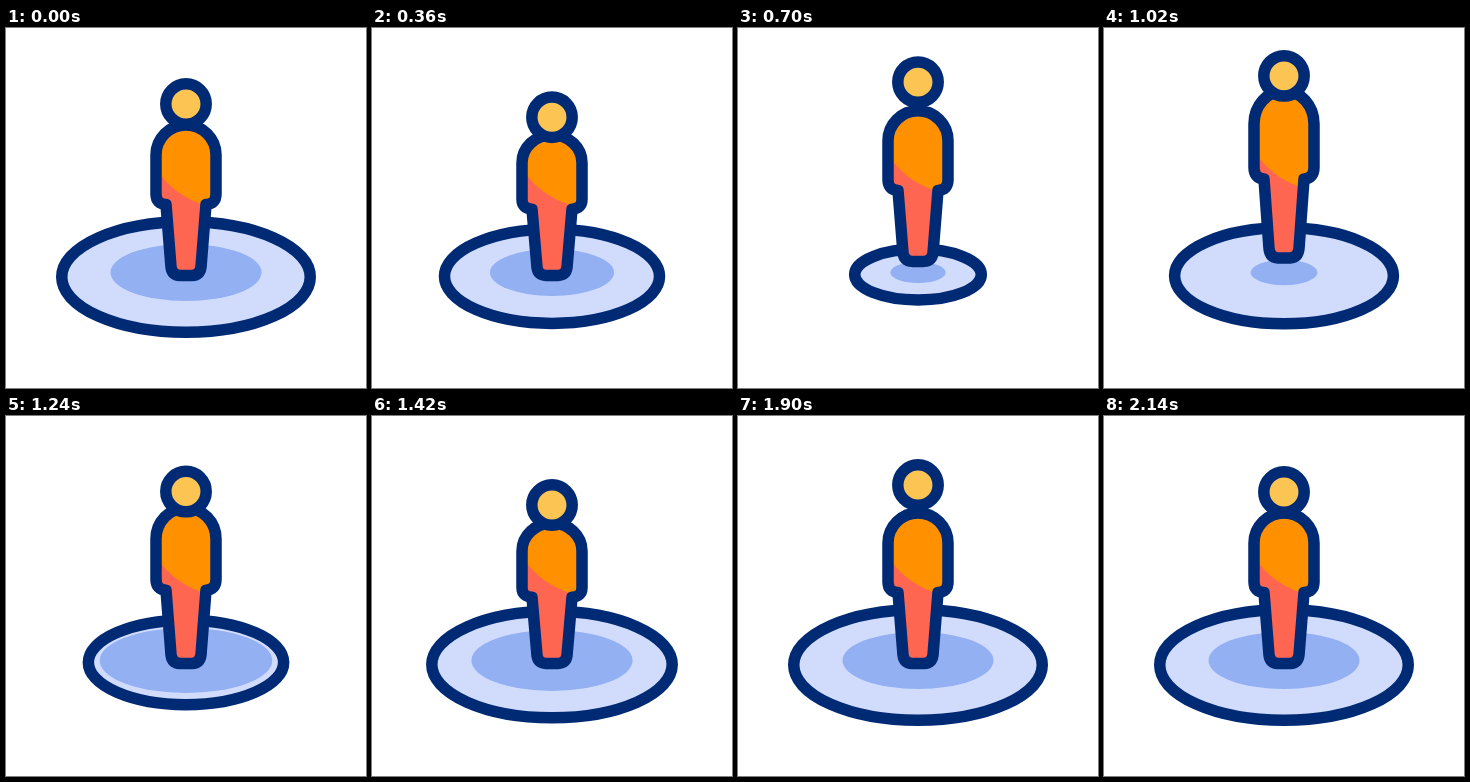
Animation, 360 px wide and 360 px high, one loop 3 s. Source, as an HTML page:

```html
<!DOCTYPE html>
<html lang="en">
<head>
<meta charset="utf-8">
<title>Figure hopping on a disc</title>
<style>
  html, body { margin: 0; width: 100%; height: 100%; overflow: hidden; background: #fff; }
  svg { display: block; width: 100vw; height: 100vh; }
  .line { stroke: #012a75; stroke-width: 11.5; stroke-linejoin: round; }
</style>
</head>
<body>
<svg viewBox="0 0 360 360">
  <defs><clipPath id="bodyClip"><path id="clipShape"/></clipPath></defs>
  <ellipse id="disc" class="line" cx="180" fill="#d1dcfd"/>
  <ellipse id="pad" cx="180" cy="244.5" fill="#93b0f3"/>
  <path id="body" fill="#ff9100"/>
  <path id="shade" fill="#ff6652" clip-path="url(#bodyClip)"/>
  <path id="outline" class="line" fill="none"/>
  <circle id="head" class="line" cx="180" r="20.2" fill="#fcc453"/>
</svg>
<script>
const LOOP = 3000;

function set(id, attributes) {
  const node = document.getElementById(id);
  for (const name in attributes) node.setAttribute(name, attributes[name]);
}

// Smooth 0 to 1 between two times in ms.
function step(time, from, to) {
  const u = Math.min(1, Math.max(0, (time - from) / (to - from)));
  return u * u * (3 - 2 * u);
}

// Rises from start to top, holds until release, falls back by end.
function pulse(time, start, top, release, end) {
  return step(time, start, top) - step(time, release, end);
}

// Each part rests at a base value and is pushed by overlapping pulses:
// crouch, leap, landing and a last small nod.
const headY = t => 76
  + 14 * pulse(t, 120, 400, 400, 840)
  - 33 * pulse(t, 400, 840, 920, 1420)
  + 13 * pulse(t, 920, 1420, 1420, 1780)
  - 9.5 * pulse(t, 1420, 1780, 1780, 2140);

const shoulderShift = t =>
  10 * pulse(t, 120, 380, 460, 940)
  - 38 * pulse(t, 460, 940, 940, 1420)
  + 10 * pulse(t, 940, 1420, 1420, 1640);

const footShift = t => -28 * pulse(t, 520, 880, 880, 1220);

const discScale = t => 1
  - 0.514 * pulse(t, 200, 680, 680, 860)
  + 0.11 * pulse(t, 680, 860, 860, 1140)
  - 0.265 * pulse(t, 860, 1140, 1140, 1500);

const padScale = t => 1
  - 0.642 * pulse(t, 160, 740, 960, 1260)
  + 0.152 * pulse(t, 960, 1260, 1260, 1560);

const landing = t => pulse(t, 900, 1200, 1200, 1500);

// The body stretches between shoulders and feet at constant line width.
function bodyPath(shoulders, feet) {
  const y = base => (base + shoulders + (feet - shoulders) * (base - 97) / 150).toFixed(2);
  return `M150 ${y(127)}C150 ${y(110.4)} 163.4 ${y(97)} 180 ${y(97)}` +
    `S210 ${y(110.4)} 210 ${y(127)}V${y(166)}Q210 ${y(176)} 200 ${y(176.5)}` +
    `L195 ${y(239)}Q194 ${y(247)} 186 ${y(247.5)}H174Q166 ${y(247)} 165 ${y(239)}` +
    `L160 ${y(176.5)}Q150 ${y(176)} 150 ${y(166)}Z`;
}

function render(time) {
  const feet = footShift(time);
  const d = bodyPath(shoulderShift(time), feet);
  for (const id of ["body", "outline", "clipShape"]) set(id, { d });
  set("shade", { d: `M148 ${136.5 + feet}q18 34 64 45v80h-64Z` });
  set("head", { cy: headY(time) });

  const shrink = 1 - discScale(time);
  set("disc", {
    rx: 124.25 * (1 - shrink),
    ry: 55.25 * (1 - 1.1 * shrink),
    cy: 249 - 5 * shrink - 1.6 * landing(time)
  });

  const pad = padScale(time);
  set("pad", { rx: 75.5 * pad, ry: 28.5 * pad });
}

const start = performance.now();
function tick() {
  render((performance.now() - start) % LOOP);
  requestAnimationFrame(tick);
}
tick();
</script>
</body>
</html>
```
